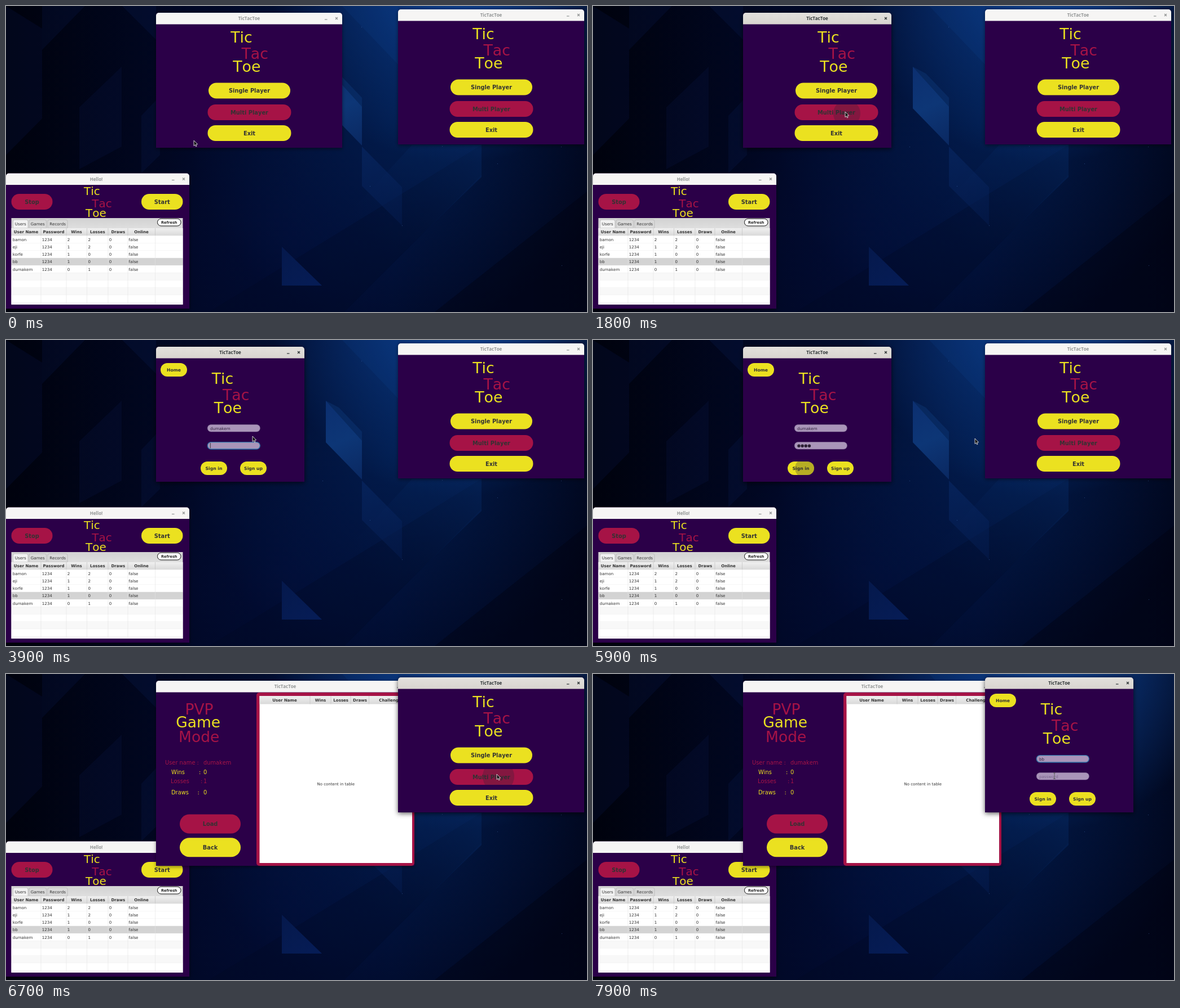
An HTML page with a canvas for the animation above (8 s loop, 1030 px wide and 544 px high).

```html
<!DOCTYPE html>
<html lang="en">
<head>
<meta charset="utf-8">
<title>TicTacToe</title>
<style>
  html, body { margin: 0; width: 100%; height: 100%; overflow: hidden; background: #00030f; }
  canvas { display: block; width: 1030px; height: 544px; }
</style>
</head>
<body>
<canvas id="stage" width="1030" height="544"></canvas>
<script>
const W = 1030, H = 544, LOOP = 8000;
const YELLOW = '#ebe120', RED = '#a61346', PURPLE = '#2b0048', INK = '#333333';
const SANS = '"DejaVu Sans", sans-serif', TITLE = '"Noto Sans", "Open Sans", sans-serif';
const PLAYER = 'dumakem', RIVAL = 'bb';
const stage = document.getElementById('stage');
let g = stage.getContext('2d');

// ---------- helpers ----------
function text(s, x, y, size, color, { bold = false, align = 'left', family = SANS } = {}) {
  g.font = `${bold ? 'bold ' : ''}${size}px ${family}`;
  g.fontKerning = 'none';
  g.textAlign = align;
  g.fillStyle = color;
  g.fillText(s, x, y);
}

function shape(x, y, w, h, r, fill, stroke, line = 1) {
  g.beginPath();
  g.roundRect(x, y, w, h, r);
  if (fill) { g.fillStyle = fill; g.fill(); }
  if (stroke) { g.strokeStyle = stroke; g.lineWidth = line; g.stroke(); }
}

function fade(x0, y0, x1, y1, ...colors) {
  const grad = g.createLinearGradient(x0, y0, x1, y1);
  colors.forEach((c, i) => grad.addColorStop(i / (colors.length - 1), c));
  return grad;
}

function poly(fill, ...p) {
  g.beginPath();
  for (let i = 0; i < p.length; i += 2) g.lineTo(p[i], p[i + 1]);
  g.closePath();
  g.fillStyle = fill;
  g.fill();
}

function line(x0, y0, x1, y1, color, width = 1) {
  g.beginPath();
  g.moveTo(x0, y0);
  g.lineTo(x1, y1);
  g.strokeStyle = color;
  g.lineWidth = width;
  g.stroke();
}

function button(label, x, y, w, h, color, size = 9.85, ripple) {
  shape(x, y, w, h, h / 2, color);
  text(label, x + w / 2, y + h / 2 + size * 0.36, size, INK, { bold: true, align: 'center' });
  if (!ripple) return;
  g.save();
  g.beginPath();
  g.roundRect(x, y, w, h, h / 2);
  g.clip();
  g.beginPath();
  g.arc(ripple.x, ripple.y, ripple.r, 0, Math.PI * 2);
  g.fillStyle = 'rgba(40,36,50,.27)';
  g.fill();
  g.restore();
}

// ---------- wallpaper ----------
function glow(x, y, r, color) {
  const grad = g.createRadialGradient(x, y, 0, x, y, r);
  grad.addColorStop(0, `rgba(${color})`);
  grad.addColorStop(1, `rgba(${color.replace(/[^,]+$/, '0')})`);
  g.fillStyle = grad;
  g.fillRect(0, 0, W, H);
}

function paintWallpaper() {
  g.fillStyle = fade(0, 0, W, 0, '#00020d', '#010826', '#010b2c', '#01061c');
  g.fillRect(0, 0, W, H);
  glow(800, -50, 330, '18,84,180,.85');
  glow(700, 200, 380, '3,42,104,.55');
  glow(500, 420, 260, '2,18,72,.35');

  // faint facets on the left
  poly('rgba(12,26,80,.22)', 0, 0, 64, 40, 64, 200, 0, 265);
  poly('rgba(14,32,92,.2)', 64, 0, 140, 0, 64, 78);
  poly('rgba(10,26,80,.2)', 130, 180, 205, 108, 205, 250, 130, 290);
  poly('rgba(12,34,92,.22)', 206, 0, 266, 0, 266, 60);
  poly('rgba(10,30,90,.2)', 240, 195, 273, 160, 273, 265, 240, 297);

  // large diagonals
  poly('rgba(14,70,150,.16)', 596, 0, 695, 0, 695, 104);
  poly('rgba(2,8,32,.28)', 360, 544, 843, 247, 843, 300, 600, 544);
  poly(fade(843, 247, 660, 430, 'rgba(8,52,120,.42)', 'rgba(4,24,70,0)'),
    720, 247, 843, 247, 843, 304, 640, 500, 560, 420);
  poly('rgba(0,2,14,.35)', 1030, 330, 1030, 544, 760, 544);

  // bright folded band
  poly(fade(567, 108, 631, 248, '#0c2f70', '#0d3676', '#0a2861'),
    567, 108, 631, 179, 631, 248, 567, 182);
  poly('rgba(24,84,160,.22)', 567, 108, 590, 120, 631, 163, 631, 179);
  poly(fade(631, 248, 702, 390, 'rgba(12,50,118,.4)', 'rgba(5,28,80,.45)'),
    631, 250, 702, 322, 702, 390, 631, 320);
  poly(fade(489, 428, 540, 497, '#05194c', '#061c55'), 489, 428, 560, 497, 489, 497);

  // specks
  g.fillStyle = 'rgba(90,140,220,.4)';
  for (const [x, y] of [[630, 37], [561, 250], [702, 390], [645, 320], [985, 461], [773, 249], [871, 280], [984, 250]])
    g.fillRect(x, y, 1, 1);
}

const wall = document.createElement('canvas');
wall.width = W;
wall.height = H;
const screen = g;
g = wall.getContext('2d');
paintWallpaper();
g = screen;

// ---------- windows ----------
function frame(x, y, w, h, title, active) {
  g.save();
  g.shadowColor = `rgba(0,0,0,${active ? 0.65 : 0.45})`;
  g.shadowBlur = active ? 9 : 6;
  g.shadowOffsetY = 2;
  shape(x, y, w, h, [5, 5, 0, 0], PURPLE);
  g.restore();
  shape(x, y, w, 20.5, [5, 5, 0, 0], active ? fade(0, y, 0, y + 20, '#e3e0dc', '#d9d5d0') : '#f6f5f4');
  const ink = active ? '#2e3436' : '#929595', r = x + w;
  text(title, title === 'Hello!' ? 160 : x + w / 2, y + 13.2, 7.9, ink, { bold: true, align: 'center', family: TITLE });
  line(r - 31, y + 12, r - 26.5, y + 12, ink, 1.2);
  line(r - 12, y + 8, r - 8, y + 12, ink, 1.2);
  line(r - 8, y + 8, r - 12, y + 12, ink, 1.2);
}

function logo(x, y, k = 1) {
  const size = 26.8 * k;
  text('Tic', x, y, size, YELLOW);
  text('Tac', x + 19.2 * k, y + 29.5 * k, size, RED);
  text('Toe', x + 4 * k, y + 52.6 * k, size, YELLOW);
}

function menu(ripple) {
  logo(398.2, 64.6);
  button('Single Player', 359, 136.5, 145, 28, YELLOW);
  button('Multi Player', 357.5, 175, 148, 28, RED, 9.85, ripple);
  button('Exit', 357.5, 212, 148, 28, YELLOW);
}

function field(y, focused) {
  shape(357.3, y, 93, 12.4, 6, '#a995b9', focused ? '#2c72a8' : '#8f7ba3', focused ? 1.3 : 0.6);
}

function caret(x, y) {
  line(x, y, x, y + 9.4, '#222', 0.8);
}

function form({ name, dots, focus, blink, ripple }) {
  logo(364.7, 77.8);
  button('Home', 274, 41, 47, 24, YELLOW, 7.7);
  field(150.6, focus === 'name');
  field(181.6, focus === 'pass');
  text(name, 362, 159.6, 7.1, '#32233f');
  for (let i = 0; i < dots; i++) {
    g.beginPath();
    g.arc(365 + i * 6.15, 188.2, 2.7, 0, Math.PI * 2);
    g.fillStyle = '#2a2033';
    g.fill();
  }
  if (!dots && focus !== 'pass') text('password', 362, 190.5, 7.1, '#7c6890');
  if (blink && focus === 'name') caret(362.3 + g.measureText(name).width * (name ? 1 : 0), 152.2);
  if (blink && focus === 'pass') caret(362.3 + dots * 6.15, 183);
  button('Sign in', 345, 216, 47, 24, YELLOW, 7.7, ripple);
  button('Sign up', 415, 216, 47, 24, YELLOW, 7.7);
}

function header(x, y, w, h, cells, seps) {
  g.fillStyle = fade(0, y, 0, y + h, '#f0f0f0', '#d9d9d9');
  g.fillRect(x, y, w, h);
  for (const s of seps) line(s, y, s, y + h, '#c2c2c2', 0.7);
  for (const [label, cx] of cells)
    text(label, cx, y + h / 2 + 2.6, 7.05, INK, { bold: true, align: 'center' });
}

function lobby() {
  const mid = { align: 'center' };
  text('PVP', 342.5, 72.2, 26.5, RED, mid);
  text('Game', 340.7, 95.4, 26.5, YELLOW, mid);
  text('Mode', 342.2, 120.6, 26.5, RED, mid);
  const stats = [
    ['User name :', 282, 160.6, PLAYER, RED], ['Wins', 293, 177.6, '0', YELLOW],
    ['Losses', 292, 194.4, '1', RED], ['Draws', 293, 214.4, '0', YELLOW]
  ];
  stats.forEach(([label, x, y, value, color], i) => {
    text(label, x, y, 9.85, color);
    if (i) text(':', [0, 342, 345, 339.5][i], y, 9.85, color);
    text(value, 350, y, 9.85, color);
  });
  button('Load', 308, 249.5, 108, 34, RED);
  button('Back', 308, 291.3, 108, 34, YELLOW);

  shape(444, 33, 280, 308, 5, RED);
  g.fillStyle = '#fff';
  g.fillRect(449.5, 39, 270.5, 297);
  header(449.5, 39, 270.5, 14.5,
    [['User Name', 494], ['Wins', 557.5], ['Losses', 593.7], ['Draws', 627.5], ['Challenge', 681]],
    [539, 576, 611, 643.5]);
  text('No content in table', 584.8, 197.6, 6.95, INK, mid);
}

function server() {
  frame(0, 297.5, 325, 240.5, 'Hello!', false);
  logo(138, 335.8, 0.745);
  button('Stop', 9.5, 334, 73, 28, RED);
  button('Start', 240, 334, 73.5, 28, YELLOW);

  g.fillStyle = fade(0, 377, 0, 395, '#d2d2d2', '#dedede');
  g.fillRect(9.5, 377, 304, 18);
  [['Users', 12.5, 26.5], ['Games', 41, 30.5], ['Records', 74, 35]].forEach(([label, x, w], i) => {
    shape(x, 380, w, 15, [3, 3, 0, 0], i ? '#d9d9d9' : '#f2f2f2', '#b4b4b4', 0.7);
    text(label, x + w / 2, 389.8, 7.1, INK, { align: 'center' });
  });
  shape(268.5, 378.2, 41.5, 12.8, 6.4, '#fff', '#111', 1);
  text('Refresh', 289.2, 387, 6.5, '#222', { bold: true, align: 'center' });

  const seps = [62, 107, 143.5, 181, 216, 264.5], rowH = 13.2, top = 408.5;
  g.fillStyle = '#fff';
  g.fillRect(9.5, 395, 304, 135.5);
  header(9.5, 395, 304, 13.5,
    [['User Name', 35.5], ['Password', 84.5], ['Wins', 125], ['Losses', 162.3], ['Draws', 198.8], ['Online', 240]], seps);
  const rows = [['bamon', 2, 2], ['eji', 1, 2], ['korfe', 1, 0], [RIVAL, 1, 0], [PLAYER, 0, 1]];
  for (let i = 0; i < 10; i++) {
    const y = top + i * rowH, h = Math.min(rowH, 530.5 - y);
    g.fillStyle = i === 3 ? '#d3d3d3' : i > 4 && i % 2 ? '#f8f8f8' : '#fff';
    g.fillRect(9.5, y, 304, h);
    line(9.5, y + h, 313.5, y + h, '#e4e4e4', 0.6);
    if (!rows[i]) continue;
    const [name, wins, losses] = rows[i];
    [[name, 11.7], ['1234', 63.7], [wins, 108.8], [losses, 145.4], ['0', 182.8], ['false', 217.6]]
      .forEach(([s, x]) => text(s, x, y + 9.2, 7.1, INK));
  }
  for (const s of seps) line(s, top, s, 530.5, '#e2e2e2', 0.6);
}

// ---------- timeline ----------
const ripple = (t, start, x, y, speed, max) =>
  t >= start ? { x, y, r: Math.min(max, 8 + (t - start) * speed) } : null;

function typed(word, t, steps) {
  const n = steps.filter(([at]) => t >= at).pop();
  return n ? word.slice(0, n[1]) : '';
}

function firstWindow(t) {
  const wide = t >= 6000;
  const w = t < 1800 ? 330 : wide ? 458 : 263;
  frame(266, 12, w, wide ? 329 : 240, 'TicTacToe', t >= 1700 && t < 6600);
  if (t < 1900) return menu(ripple(t, 1700, 450, 191, 0.16, 30));
  if (t >= 6100) return lobby();
  form({
    name: typed(PLAYER, t, [[3300, 2], [3400, 4], [3500, 6], [3700, 7]]),
    dots: Math.max(0, Math.min(4, (t - 4700) / 100)),
    focus: t < 3900 ? 'name' : t < 5600 ? 'pass' : '',
    blink: t < 2200 || (t >= 3300 && t < 4400) || t >= 4800,
    ripple: ripple(t, 5600, 375, 228, 0.03, 17)
  });
}

function secondWindow(t) {
  g.save();
  g.translate(429, -6);
  frame(266, 12, t < 6800 ? 330 : 263, 240, 'TicTacToe', t >= 6600);
  if (t < 6900) menu(ripple(t, 6600, 444, 188, 0.2, 36));
  else form({
    name: typed(RIVAL, t, [[7600, 1], [7700, 2]]),
    dots: 0,
    focus: 'name',
    blink: t < 7300 || (t >= 7600 && t < 7900)
  });
  g.restore();
}

// time, x, y of the pointer tip
const PATH = [
  [500, 333, 239], [700, 357, 218], [900, 357, 218], [1500, 447, 188], [2100, 447, 188],
  [2400, 437, 171], [5200, 437, 171], [5500, 375, 228], [5700, 375, 228], [5900, 677, 175],
  [6100, 868, 180], [6500, 870, 178], [6800, 870, 178], [7000, 866, 182], [7100, 864, 203],
  [7300, 830, 140], [7500, 812, 150], [7700, 812, 150], [7900, 818, 181]
];

function pointerAt(t) {
  const i = PATH.findIndex(k => k[0] >= t);
  if (i < 0) return PATH[PATH.length - 1].slice(1);
  if (i === 0) return PATH[0].slice(1);
  const [t0, x0, y0] = PATH[i - 1], [t1, x1, y1] = PATH[i];
  let u = (t - t0) / (t1 - t0);
  u = u * u * (3 - 2 * u);
  return [x0 + (x1 - x0) * u, y0 + (y1 - y0) * u];
}

function pointer(t) {
  const [x, y] = pointerAt(t);
  const overField = t >= 7100 && x > 786 && x < 879 && ((y > 145 && y < 157) || (y > 175 && y < 188));
  g.save();
  g.translate(x, y);
  if (overField) {
    for (const [color, w] of [['rgba(255,255,255,.55)', 2], ['#1c1422', 0.9]]) {
      line(0, -5, 0, 5, color, w);
      line(-2, -5.2, 2, -5.2, color, w);
      line(-2, 5.2, 2, 5.2, color, w);
    }
  } else {
    poly('#141414', 0, 0, 0, 9.6, 2.1, 7.7, 3.6, 10.8, 5.1, 10.1, 3.7, 7.1, 6.6, 6.8);
    g.strokeStyle = '#f4f4f4';
    g.lineWidth = 0.8;
    g.stroke();
  }
  g.restore();
}

function render(now) {
  const t = Math.floor((now % LOOP) / 100) * 100;
  g.drawImage(wall, 0, 0);
  server();
  const layers = [firstWindow, secondWindow];
  if (t >= 6000 && t < 6600) layers.reverse();
  layers.forEach(draw => draw(t));
  pointer(t);
}

let start;
function tick(now) {
  start ??= now;
  render(now - start);
  requestAnimationFrame(tick);
}
render(0);
requestAnimationFrame(tick);
</script>
</body>
</html>
```
